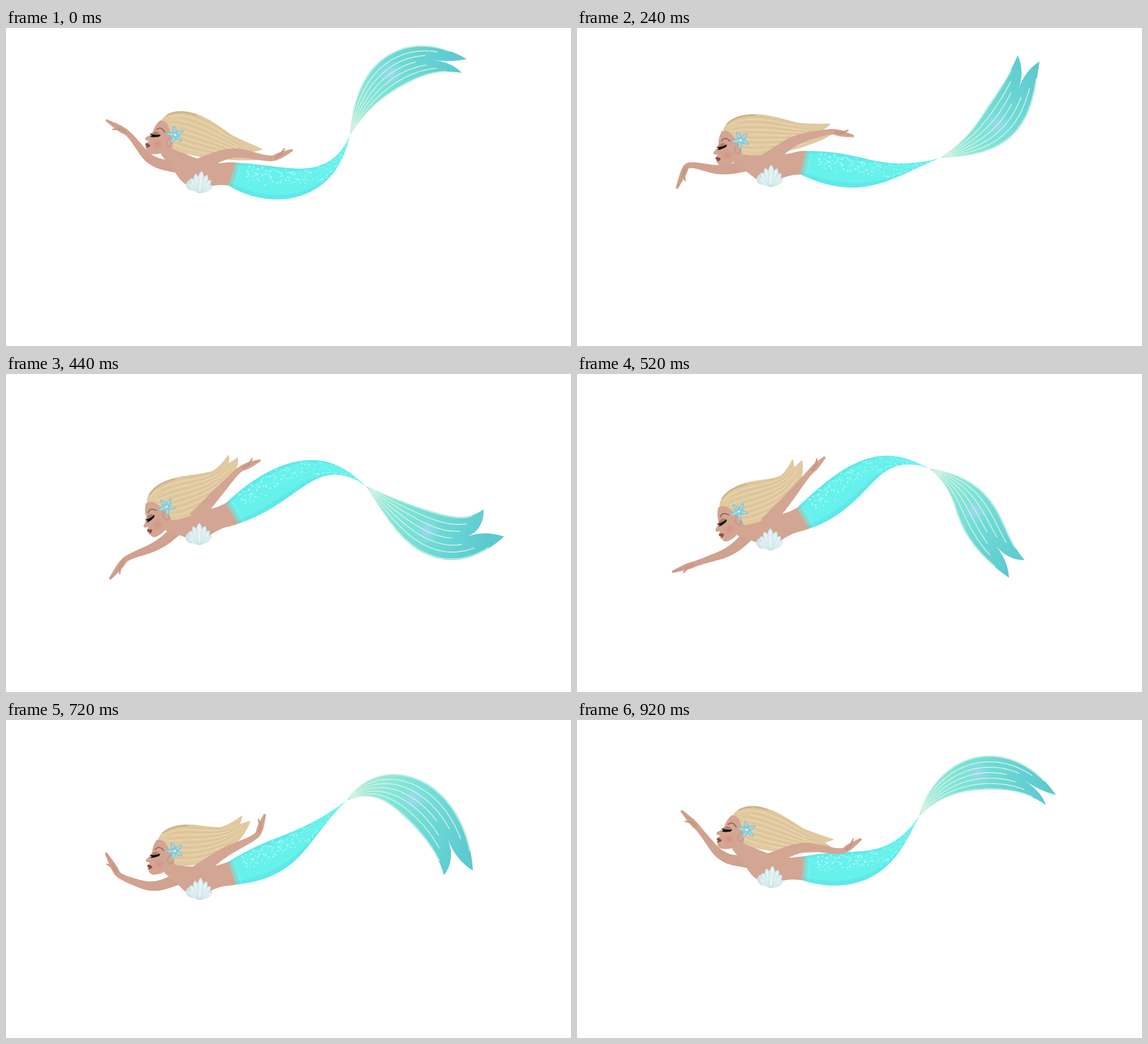
Animation of 998 by 561 pixels, one loop 0.96 s. Source, as an HTML page:

```html
<!DOCTYPE html>
<html lang="en">
<head>
<meta charset="utf-8">
<title>Swimming mermaid</title>
<style>
html, body { margin: 0; width: 100%; height: 100%; overflow: hidden; background: #fff; }
svg { display: block; width: 100%; height: 100%; }
</style>
</head>
<body>
<svg id="stage" viewBox="0 0 998 561" stroke-linecap="round" stroke-linejoin="round">
  <defs>
    <linearGradient id="waist" gradientUnits="userSpaceOnUse">
      <stop offset="0" stop-color="#67efea" stop-opacity="0"/>
      <stop offset=".55" stop-color="#67efea" stop-opacity=".8"/>
      <stop offset="1" stop-color="#67f1ec"/>
    </linearGradient>
    <linearGradient id="fin" gradientUnits="userSpaceOnUse">
      <stop offset="0" stop-color="#a4ebdc"/>
      <stop offset=".35" stop-color="#7be3da"/>
      <stop offset="1" stop-color="#5bc9d0"/>
    </linearGradient>
    <radialGradient id="glow">
      <stop offset="0" stop-color="#a5d8f4" stop-opacity=".9"/>
      <stop offset="1" stop-color="#8fdcec" stop-opacity="0"/>
    </radialGradient>
    <radialGradient id="blush">
      <stop offset="0" stop-color="#db8577" stop-opacity=".7"/>
      <stop offset="1" stop-color="#d3a593" stop-opacity="0"/>
    </radialGradient>
  </defs>
</svg>
<script>
const LOOP = 960, STEP = 40, RAD = Math.PI / 180;

// The upper body sways in plain waves: mean, swing, time of the peak.
const wave = (mean, amp, peak) => t => mean + amp * Math.cos((t - peak) / LOOP * 2 * Math.PI);
const SWAY = {
  chestY: wave(266, 20, 660), waistY: wave(254, 17, 750),
  eyeX: wave(260, 5, 840), eyeY: wave(226, 38, 540),
  farUpper: wave(163, 27, 20), farFore: wave(196, 37, 945), farHand: wave(177, 72, 795),
  nearUpper: wave(-36, 13, 0), nearFore: wave(-19, 32, 30), nearHand: wave(-29, 42, 220),
  hair: wave(-27, 47, 60)
};

// The tail whips through a few key poses.
const KEYS = [0, 160, 320, 440, 600, 720, 920];
const WHIP = {
  hip: [18, 32, -14, -30, -28, -18, 4],
  jointX: [608, 626, 652, 636, 611, 602, 604],
  jointY: [188, 230, 227, 198, 145, 142, 170],
  root: [-72, -38, 3, 40, -3, -40, -60],
  curl: [20, -72, -75, -38, 103, 82, 46],
  swing: [-31, -69, -16, 16, 70, 33, -7],
  spread: [26, 60, 20, 60, 23, 52, 25]
};

// Monotone cubic through the keys, wrapped around the loop.
function keyed(vals, t) {
  const n = KEYS.length;
  const at = i => KEYS[(i + n) % n] + LOOP * Math.floor(i / n);
  const val = i => vals[(i + n) % n];
  const sec = i => (val(i + 1) - val(i)) / (at(i + 1) - at(i));
  const slope = i => {
    const a = sec(i - 1), b = sec(i), da = at(i) - at(i - 1), db = at(i + 1) - at(i);
    return a * b <= 0 ? 0 : 3 * (da + db) / ((2 * db + da) / a + (db + 2 * da) / b);
  };
  let i = 0;
  while (at(i + 1) <= t) i++;
  const h = at(i + 1) - at(i), p = (t - at(i)) / h, q = 1 - p;
  return val(i) * q * q * (1 + 2 * p) + val(i + 1) * p * p * (3 - 2 * p)
    + h * p * q * (slope(i) * q - slope(i + 1) * p);
}

function poseAt(t) {
  const p = {};
  for (const k in SWAY) p[k] = SWAY[k](t);
  for (const k in WHIP) p[k] = keyed(WHIP[k], t);
  return p;
}

const mix = (a, b, s) => a.map((v, i) => v + (b[i] - v) * s);
const go = (p, deg, len) => [p[0] + len * Math.cos(deg * RAD), p[1] + len * Math.sin(deg * RAD)];
const gap = (a, b) => Math.hypot(b[0] - a[0], b[1] - a[1]);
const turned = (o, x, y, deg) => go(o, Math.atan2(y, x) / RAD + deg, Math.hypot(x, y));

function bezier(a, b, c, d, n = 40) {
  return Array.from({ length: n + 1 }, (_, i) => {
    const u = i / n, ab = mix(a, b, u), bc = mix(b, c, u), cd = mix(c, d, u);
    return mix(mix(ab, bc, u), mix(bc, cd, u), u);
  });
}

// Left and right edges of a line whose width is given along it.
function ribbon(pts, width) {
  const n = pts.length - 1, L = [], R = [];
  pts.forEach((p, i) => {
    const a = pts[Math.max(0, i - 1)], b = pts[Math.min(n, i + 1)];
    const w = width(i / n, i) / 2 / (gap(a, b) || 1);
    const nx = (b[1] - a[1]) * w, ny = (a[0] - b[0]) * w;
    L.push([p[0] + nx, p[1] + ny]);
    R.push([p[0] - nx, p[1] - ny]);
  });
  return [L, R];
}

const xy = p => p[0].toFixed(1) + ' ' + p[1].toFixed(1);
const line = pts => 'M' + pts.map(xy).join('L');
const closed = (A, B) => line([...A, ...B.slice().reverse()]) + 'Z';
const between = (A, B, s, from = 0, to = 1) => {
  const n = A.length - 1;
  return A.map((p, i) => mix(p, B[i], s)).slice(Math.round(from * n), Math.round(to * n) + 1);
};

// Corner-cut a chain of [x, y, width] points into a soft limb.
function limb(chain) {
  let c = chain;
  for (let k = 0; k < 3; k++)
    c = [c[0], ...c.slice(1).flatMap((p, i) => [mix(c[i], p, .2), mix(c[i], p, .8)]), c[c.length - 1]];
  return closed(...ribbon(c, (u, i) => c[i][2]));
}

const stage = document.getElementById('stage');
function add(tag, attrs, parent = stage) {
  const el = document.createElementNS(stage.namespaceURI, tag);
  for (const k in attrs) el.setAttribute(k, attrs[k]);
  return parent.appendChild(el);
}
const set = (el, d) => el.setAttribute('d', d);
const fill = (color, opacity = 1, parent = stage) => add('path', { fill: color, 'fill-opacity': opacity }, parent);
const stroke = (color, width, opacity = 1, parent = stage) =>
  add('path', { fill: 'none', stroke: color, 'stroke-width': width, 'stroke-opacity': opacity }, parent);
const drawn = (el, d) => { set(el, d); return el; };

const SKIN = '#d3a593', SHADE = '#b98170';
const armParts = (skin, dark) => ({ arm: fill(skin), thumb: fill(dark), crease: stroke(SHADE, .8, .6) });

const far = armParts('#d0a28f', '#c99885');
const fin = fill('url(#fin)');
const glow = add('circle', { r: 24, fill: 'url(#glow)' });
const ribs = stroke('#d3f3df', 1.7, .95);
const torso = fill(SKIN);
const tail = fill('url(#waist)'), tailLow = fill('#3fcbd8', .22), tailTop = fill('#3fcbd8', .2);
const dots = fill('#d2fffa', .6);
const hair = fill('#e1c9a0'), lock = fill('#e1c9a0');
const hairDark = stroke('#cbb085', 1, .5), hairLight = stroke('#efdfbb', 1.3, .7), crown = stroke('#b0956b', 2, .5);

const head = add('g');
drawn(fill(SKIN, 1, head), 'M5-29Q-3-20-5-8Q-8-1-16 4Q-19 7-15 9L-10 10Q-13 13-15 15Q-17 17-14 19Q-16 22-13 24Q-13 29-7 32Q5 33 16 28L31 21Q35 12 29 0Q25-13 20-22Q14-30 5-29Z');
add('circle', { cx: 6, cy: 14, r: 13, fill: 'url(#blush)' }, head);
add('ellipse', { cx: 27, cy: 7, rx: 5, ry: 8, fill: '#d6a693', stroke: '#bb8472', 'stroke-width': .8, transform: 'rotate(18 27 7)' }, head);
drawn(fill('#b27f67', 1, head), 'M-6-4Q2-13 9-3Q2 1-6-4Z');
drawn(fill('#17100f', 1, head), 'M-10-4Q-3-1 9-4Q9 0 3 1Q-3 3-9 2L-6 0Z');
drawn(stroke('#8a5d47', 1.6, 1, head), 'M1-12Q8-20 16-9');
drawn(fill('#8d4a43', 1, head), 'M-14 14Q-9 14-6 18Q-9 22-12 22Q-14 21-12 19Q-16 18-14 14Z');

const star = add('g', { transform: 'translate(35 -7) scale(.92)' }, head);
for (let k = 0; k < 5; k++) {
  const arm = add('g', { transform: `rotate(${-18 + 72 * k})` }, star);
  add('path', { fill: '#8fcfd8', stroke: '#76bcc6', 'stroke-width': .6, d: 'M-5 0Q-4-9-1-17Q1-19 2-16Q5-8 5 0Z' }, arm);
  drawn(stroke('#bdebee', 1.2, 1, arm), 'M0-2L0-13');
}
add('circle', { r: 2, fill: '#e9fbfa' }, star);

const shell = add('g');
add('ellipse', { cx: -15, cy: -11, rx: 10, ry: 10, fill: '#d3e6e9' }, shell);
for (const k of [-3, 3, -2, 2, -1, 1, 0]) {
  const len = 37 - Math.abs(k) * 4;
  const leaf = add('g', { transform: `rotate(${k * 19})` }, shell);
  add('path', { fill: '#deeff1', stroke: '#bfd9df', 'stroke-width': .7, d: `M-2 0Q-9-${len * .8} 0-${len}Q9-${len * .8} 2 0Z` }, leaf);
  drawn(stroke('#f0f9fa', 1.4, 1, leaf), `M0-5L0-${len - 6}`);
}

const near = armParts(SKIN, '#ca9885');

let seed = 11;
const rnd = () => (seed = seed * 16807 % 2147483647) / 2147483647;
const SPECKS = Array.from({ length: 240 }, () => {
  const u = .08 + .88 * rnd();
  return { u, v: u < .6 ? .05 + .55 * rnd() : .08 + .84 * rnd(), r: (.5 + 1.4 * rnd() ** 2) * (1.2 - .6 * u) };
});

function axis(id, a, b) {
  const g = document.getElementById(id);
  [['x1', a[0]], ['y1', a[1]], ['x2', b[0]], ['y2', b[1]]].forEach(([k, v]) => g.setAttribute(k, v));
}

function drawArm(parts, shoulder, angles, lengths, width) {
  const elbow = go(shoulder, angles[0], lengths[0]);
  const wrist = go(elbow, angles[1], lengths[1]);
  const palm = go(wrist, angles[2], 18), tip = go(wrist, angles[2], lengths[2]);
  set(parts.arm, limb([[...shoulder, width], [...elbow, 17], [...wrist, 9], [...palm, 12], [...tip, 4]]));
  set(parts.thumb, limb([[...mix(wrist, palm, .4), 5], [...palm, 5], [...go(palm, angles[2] - 35, 15), 2]]));
  set(parts.crease, line([palm, mix(palm, tip, .85)]));
}

function drawFin(p, joint) {
  const end = go(joint, p.swing, 235), reach = 104;
  const spine = bezier(joint, go(joint, p.root, reach), go(end, p.curl, -reach), end);
  const span = 48 + .32 * p.spread;
  const [A, B] = ribbon(spine, u => span * Math.sin(Math.PI * u ** 1.05) + p.spread * u ** 3);
  const pull = xy(spine[37]);
  set(fin, `${line(A)}Q${pull} ${xy(spine[32])}Q${pull} ${xy(B[40])}L${B.slice().reverse().map(xy).join('L')}Z`);
  axis('fin', joint, end);
  glow.setAttribute('cx', spine[19][0]);
  glow.setAttribute('cy', spine[19][1]);
  // Ribs run longer toward the two lobes.
  set(ribs, Array.from({ length: 7 }, (_, i) => {
    const s = .02 + .16 * i;
    return line(between(A, B, s, .02, .68 + .22 * Math.abs(s - .5) / .5));
  }).join(''));
}

function drawTail(p, waist, joint) {
  const h = .45 * gap(waist, joint);
  const spine = bezier(waist, go(waist, p.hip, h), go(joint, p.root, -h), joint);
  const [T, L] = ribbon(spine, u => (1 - u) * (42 + 190 * u * (1 - u)));
  set(tail, closed(T, L));
  set(tailLow, closed(between(T, L, .86), L));
  set(tailTop, closed(T, between(T, L, .1)));
  axis('waist', go(waist, p.hip, -3), go(waist, p.hip, 15));
  set(dots, SPECKS.map(({ u, v, r }) => {
    const f = u * 40, i = Math.floor(f);
    const c = mix(mix(T[i], T[i + 1], f - i), mix(L[i], L[i + 1], f - i), v);
    return `M${xy([c[0] - r, c[1]])}a${r} ${r} 0 1 0 ${2 * r} 0a${r} ${r} 0 1 0 ${-2 * r} 0`;
  }).join(''));
}

function drawHair(p, eye, turn) {
  const root = turned(eye, 5, -17, turn), swell = turned(root, 50, -4, turn);
  const nape = [375, p.chestY - 50], tip = go(nape, p.hair, 80);
  const strand = (end, w) =>
    ribbon(bezier(root, swell, nape, end), u => w * Math.sin(Math.PI * u ** .62) ** .8);
  const [U, D] = strand(tip, 73);
  set(hair, closed(U, D));
  set(lock, closed(...strand(go(tip, p.hair - 100, 17), 56)));
  const streaks = odd => Array.from({ length: 7 }, (_, i) =>
    line(between(U, D, (2 * i + 1 + odd) / 16, .08 + .04 * (i * 3 % 5), .7 + .05 * (i * 2 % 5)))).join('');
  set(hairDark, streaks(0));
  set(hairLight, streaks(1));
  set(crown, line(between(U, D, .03, .08, .35)));
}

function render(t) {
  const p = poseAt(t);
  const chest = [334, p.chestY], waist = [398, p.waistY], joint = [p.jointX, p.jointY], eye = [p.eyeX, p.eyeY];
  // The head tilts with the line from chest to eye.
  const turn = Math.atan2(chest[1] - eye[1], chest[0] - eye[0]) / RAD - 36;

  drawArm(far, [320, p.chestY - 10], [p.farUpper, p.farFore, p.farHand], [65, 63, 48], 22);
  drawFin(p, joint);
  set(torso, limb([
    [...turned(eye, 22, 20, turn), 26], [...turned(eye, 40, 34, turn), 30], [...chest, 56],
    [...mix(chest, waist, .6), 37], [...waist, 42], [...go(waist, p.hip, 10), 44]
  ]));
  drawTail(p, waist, joint);
  drawHair(p, eye, turn);
  head.setAttribute('transform', `translate(${eye}) rotate(${turn})`);
  shell.setAttribute('transform', `translate(${chest[0] + 8} ${chest[1] + 31}) rotate(${4 + turn / 5})`);
  const reach = 82 + .5 * p.nearUpper;
  drawArm(near, [334, p.chestY - 14], [p.nearUpper, p.nearFore, p.nearHand], [reach, reach, 42], 24);
}

const start = performance.now();
let shown = 0;
render(0);
function tick() {
  const t = Math.floor((performance.now() - start) % LOOP / STEP) * STEP;
  if (t !== shown) render(shown = t);
  requestAnimationFrame(tick);
}
requestAnimationFrame(tick);
</script>
</body>
</html>
```
